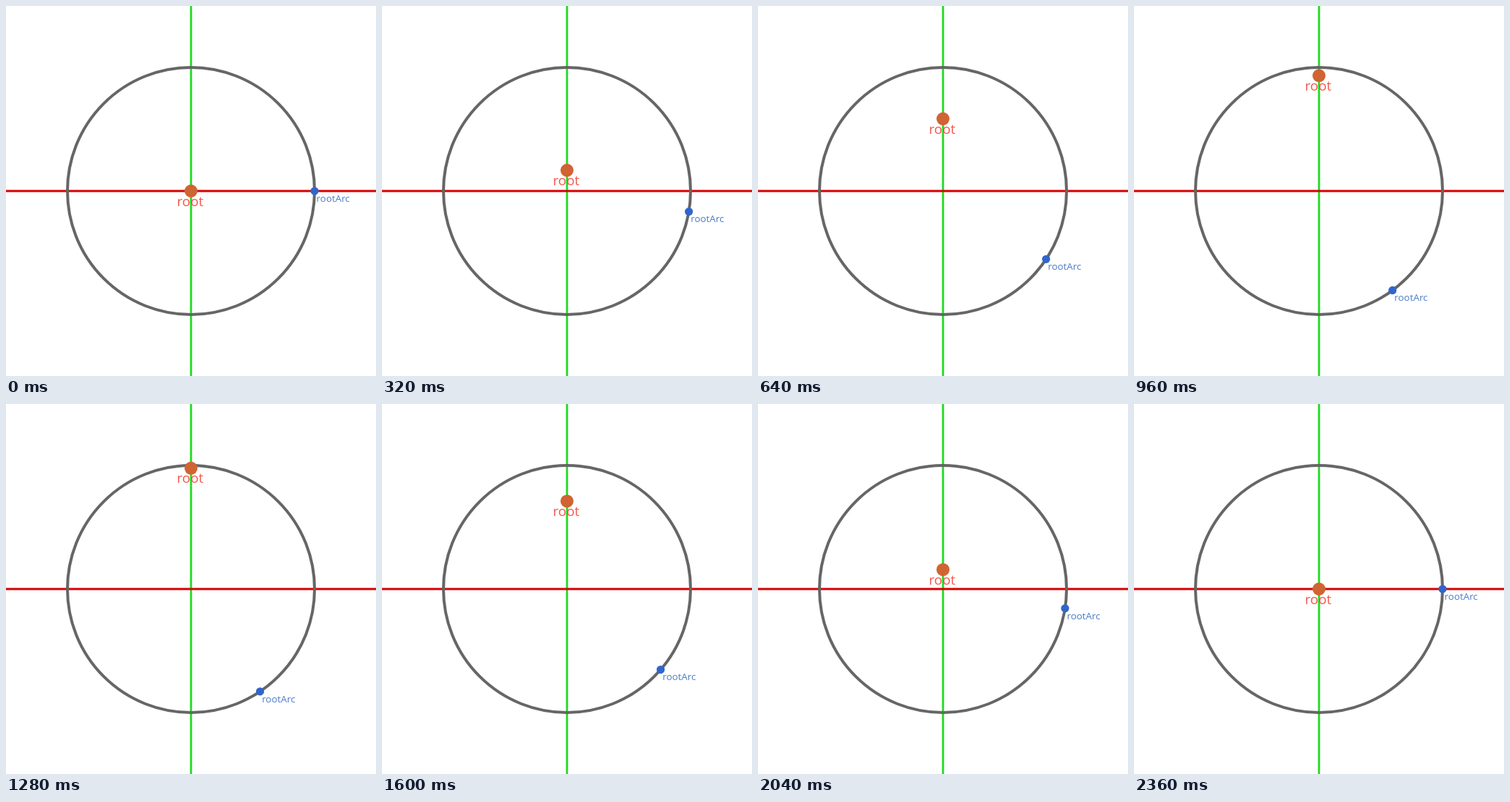
An HTML page that plays this animation: 512 by 512 pixels, repeating every 2400 ms.

```html
<!DOCTYPE html>
<html lang="en">
<head>
<meta charset="utf-8">
<title>Slide and arc</title>
<style>
  html, body { margin: 0; width: 100%; height: 100%; overflow: hidden; background: #fff; }
  svg { display: block; width: 100%; height: 100%; }
  text { font-family: "Open Sans", "Noto Sans", sans-serif; }
  .axis { stroke-width: 2.8; }
</style>
</head>
<body>
<svg viewBox="0 0 512 512">
  <path class="axis" d="M256 0V512" stroke="#1fd91f"/>
  <path class="axis" d="M0 256H512" stroke="#d60000"/>
  <circle cx="256" cy="256" r="171" fill="none" stroke="#666" stroke-width="4"/>
  <g id="root">
    <circle r="9" fill="#d06432"/>
    <text x="-19.5" y="20.5" font-size="18.8" fill="#f4584c">root</text>
  </g>
  <g id="arc">
    <circle r="5.6" fill="#2f66cc"/>
    <text x="2.6" y="14.8" font-size="13.4" fill="#4a7cc8">rootArc</text>
  </g>
</svg>
<script>
const CENTER = 256, RADIUS = 171;
const TICK = 40, TICKS = 60, PEAK = 29, END = 59;
const HANDLE = 0.39;
const root = document.getElementById('root');
const arc = document.getElementById('arc');

// Symmetric Bezier ease: solve x(s) = x by bisection, return y(s).
function ease(x) {
  let lo = 0, hi = 1;
  for (let i = 0; i < 24; i++) {
    const s = (lo + hi) / 2, r = 1 - s;
    const bx = 3 * HANDLE * s * r * r + 3 * (1 - HANDLE) * s * s * r + s * s * s;
    if (bx < x) lo = s; else hi = s;
  }
  return lo * lo * (3 - 2 * lo);
}

function place(node, x, y) {
  node.setAttribute('transform', `translate(${x.toFixed(2)} ${y.toFixed(2)})`);
}

// The arc point covers the same length along the circle as the root does upwards.
function draw(now) {
  const tick = Math.floor((now + 2) / TICK) % TICKS;
  const angle = tick <= PEAK ? ease(tick / PEAK) : ease((END - tick) / (END - PEAK));
  place(root, CENTER, CENTER - RADIUS * angle);
  place(arc, CENTER + RADIUS * Math.cos(angle), CENTER + RADIUS * Math.sin(angle));
}

let start;
function loop(now) {
  start ??= now;
  draw(now - start);
  requestAnimationFrame(loop);
}
draw(0);
requestAnimationFrame(loop);
</script>
</body>
</html>
```
